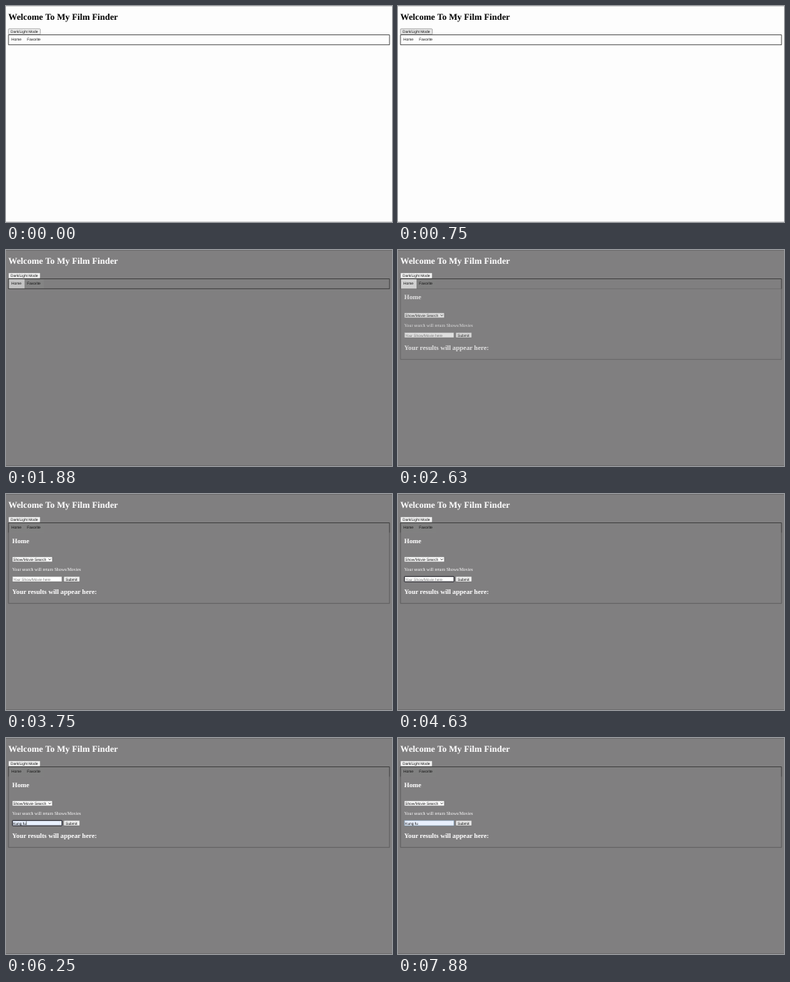
Animation, 500 px wide and 281 px high, one loop 8 s. Source, as an HTML page:

```html
<!DOCTYPE html>
<html lang="en">
<head>
<meta charset="utf-8">
<style>
  html, body { margin: 0; width: 100%; height: 100%; overflow: hidden; }
  svg { display: block; width: 500px; height: 281px; }
  text { font: 4.85px "Liberation Sans", Arial, sans-serif; fill: #111; text-rendering: geometricPrecision; white-space: pre; }
  .serif { font-family: "Liberation Serif", "Times New Roman", serif; font-size: 5.79px; fill: #fff; }
  .h1 { font-size: 11.57px; font-weight: bold; }
  .h2 { font-size: 8.68px; font-weight: bold; }
  .line { fill: none; stroke: #333; stroke-width: .8; }
  .control { fill: #efefef; stroke: #666; stroke-width: .5; }
</style>
</head>
<body>
<svg viewBox="0 0 500 281">
  <rect id="page" width="500" height="281"/>
  <path d="M0 .5H500M0 280.5H500" stroke="#000" stroke-opacity=".14"/>
  <text id="title" class="serif h1" x="3" y="18.3">Welcome To My Film Finder</text>

  <rect id="mode" class="control" x="3.2" y="29.7" width="41.2" height="7.2" rx=".8"/>
  <text x="5.9" y="35">Dark/Light Mode</text>

  <rect id="homeTab" x="3.5" y="38" width="20.5" height="12.3"/>
  <rect id="favoriteTab" x="24" y="38" width="25" height="12.3"/>
  <path class="line" d="M3.2 50.4V37.5H496.8V50.4"/>
  <path id="barBottom" class="line" d="M3 50.4H497"/>
  <text x="7" y="45.4">Home</text>
  <text x="27.2" y="45.4">Favorite</text>

  <g id="content">
    <path class="line" d="M3.2 50.4V142.3H496.8V50.4" style="stroke:#4a4a4a;stroke-width:.6"/>
    <text class="serif h2" x="8" y="63.6" font-style="italic">Home</text>
    <rect class="control" x="8.2" y="81.8" width="51.8" height="6.4" rx=".6" style="fill:#fff"/>
    <text x="9.2" y="86.8">Show/Movie Search</text>
    <path d="M55.2 84.3l1.5 1.5 1.5-1.5" fill="none" stroke="#111" stroke-width=".8"/>
    <text class="serif" x="8" y="99.6">Your search will return Shows/Movies</text>
    <rect id="field" x="8.3" y="107.3" width="64.2" height="6.8" rx=".5"/>
    <text id="fieldText" x="9.2" y="112.5"></text>
    <path id="caret" d="M0 108.2V113.3" stroke="#111" stroke-width=".5"/>
    <rect id="submit" class="control" x="74.8" y="107.3" width="20.8" height="6.8" rx=".8"/>
    <text x="77.2" y="112.5">Submit</text>
    <text class="serif h2" x="8" y="129.6">Your results will appear here:</text>
  </g>

  <g id="popup">
    <path d="M34.5 118H37.5L40.3 114.9L43.2 118H61.5Q63.2 118 63.2 119.7V132.5Q63.2 134.2 61.5 134.2H34.5Q32.8 134.2 32.8 132.5V119.7Q32.8 118 34.5 118Z" fill="#35393a" stroke="#232627" stroke-width=".5"/>
    <rect id="option" x="34.5" y="121.5" width="27" height="9" rx="1" fill="#454a4b"/>
    <text x="37" y="128" style="fill:#eee">Kung fu</text>
  </g>
</svg>
<script>
const LOOP = 8000, STEP = 125;
const el = id => document.getElementById(id);
const set = (id, attrs) => {
  for (const name in attrs) el(id).style[name] = attrs[name];
};
const gray = v => `rgb(${v},${v},${v})`;
const within = (t, a, b) => t >= a && t < b;
const linear = (t, start, length) => Math.min(1, Math.max(0, (t - start) / length));
const ease = (t, start, length = 300) => 1 - (1 - linear(t, start, length)) ** 2;

function draw(t) {
  const dark = t >= 875;
  set('page', { fill: dark ? '#807f80' : '#fdfdfd' });
  set('title', { fill: dark ? '#fff' : '#000' });
  set('mode', { fill: within(t, 500, 1625) ? '#e7e7e7' : '#f2f2f2' });

  // Tab backgrounds follow the page colour late, then react to the pointer.
  const base = 253 - 125 * ease(t, 780);
  const home = ease(t, 1700) - ease(t, 3100);
  const favorite = ease(t, 1580) - ease(t, 1640);
  set('homeTab', { fill: gray(base + 80 * home) });
  set('favoriteTab', { fill: gray(base + 80 * favorite) });

  const shown = linear(t, 1950, 900);
  set('content', { opacity: shown });
  set('barBottom', { opacity: 1 - shown });

  const focused = within(t, 4625, 7875), filled = t >= 5500;
  set('field', {
    fill: filled ? '#e8f0fe' : '#fff',
    stroke: focused ? '#101018' : filled ? '#7391a8' : '#767676',
    strokeWidth: focused ? .9 : .6
  });
  el('fieldText').textContent = filled ? 'Kung fu' : 'Your Show/Movie here';
  set('fieldText', { fill: filled ? '#111' : '#777' });
  set('caret', {
    transform: `translateX(${filled ? 26.3 : 9.2}px)`,
    opacity: within(t, 4750, 5250) || within(t, 6125, 6625) || within(t, 7125, 7625) ? 1 : 0
  });
  set('submit', { fill: t >= 7875 ? '#e5e5e5' : '#efefef' });
  set('popup', { opacity: t < 4750 ? 0 : 1 - linear(t, 5625, 375) });
  set('option', { opacity: filled ? 1 : 0 });
}

function tick() {
  draw(Math.floor(performance.now() % LOOP / STEP) * STEP);
  requestAnimationFrame(tick);
}
tick();
</script>
</body>
</html>
```
